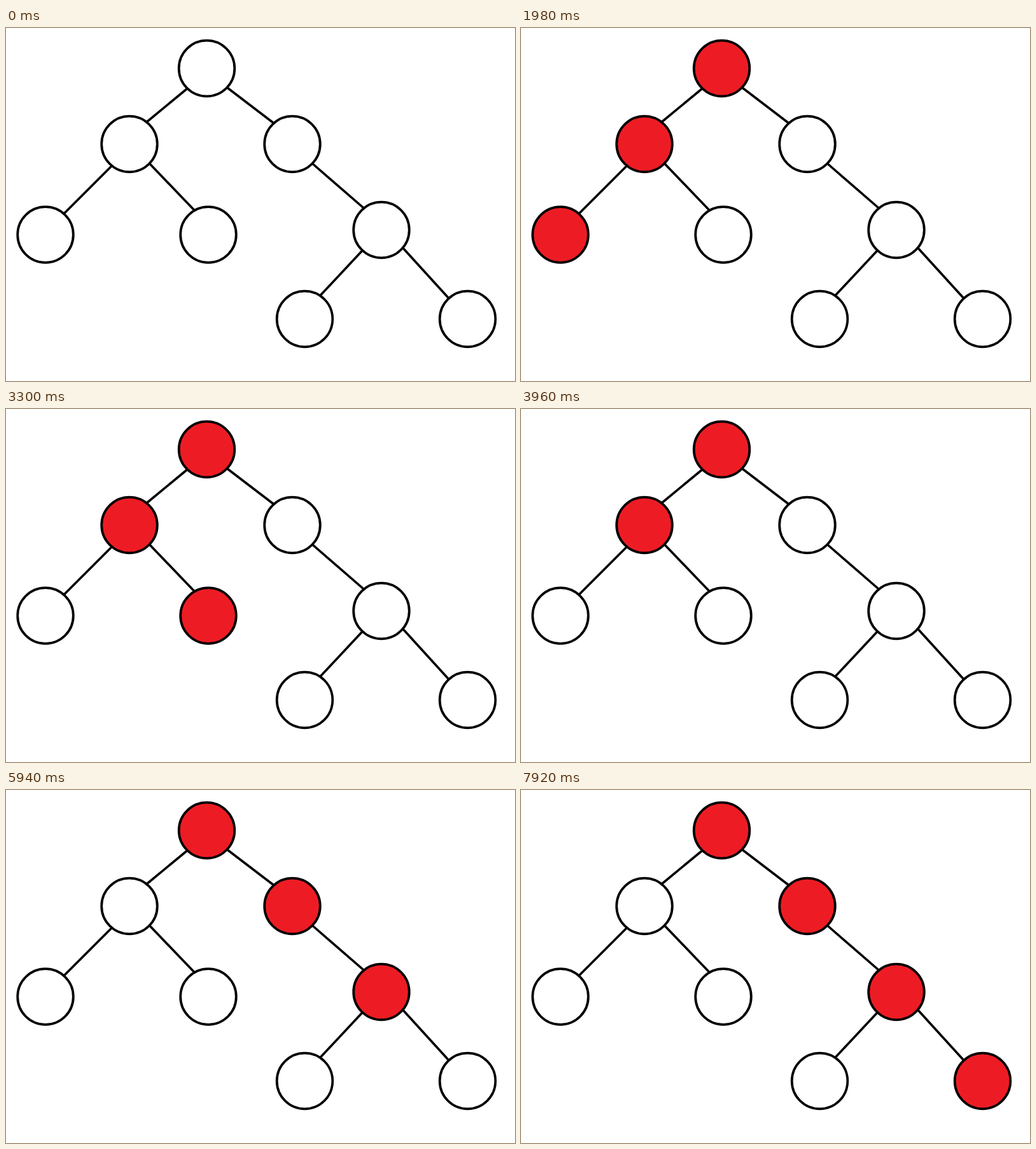
Animation, 800 px wide and 555 px high, one loop 8 s. Source, as an HTML page:

```html
<!DOCTYPE html>
<html lang="en">
<head>
<meta charset="utf-8">
<title>Depth-first traversal</title>
<style>
  html, body { margin: 0; width: 100%; height: 100%; overflow: hidden; background: #fff; }
  svg { display: block; width: 800px; height: 555px; }
  path { stroke: #000; stroke-width: 3.6; stroke-linecap: round; }
  circle { stroke: #000; stroke-width: 3.8; fill: #fff; }
  circle.on { fill: #ed1c24; }
</style>
</head>
<body>
<svg viewBox="0 0 800 555">
  <path d="M284.5 95.5L221.5 147.5M348 94L420 149M166 217L91 292M226 213.5L295.5 286M482 213.5L561.5 282.5M559.5 350.5L494.5 420M624 346L695 424"/>
</svg>
<script>
  const STEP = 660, LOOP = 8000;
  const nodes = {
    A: [315.5, 63.5],
    B: [194, 182.5], C: [450, 182.5],
    D: [62, 325], E: [318, 325], F: [590, 317.5],
    G: [469.5, 457.5], H: [725.5, 457.5]
  };
  // Nodes on the traversal stack at each step
  const stacks = ['', 'A', 'AB', 'ABD', 'AB', 'ABE', 'AB', 'A', 'AC', 'ACF', 'ACFG', 'ACF', 'ACFH'];

  const svg = document.querySelector('svg');
  const circles = {};
  for (const [name, [cx, cy]] of Object.entries(nodes)) {
    const c = document.createElementNS('http://www.w3.org/2000/svg', 'circle');
    c.setAttribute('cx', cx);
    c.setAttribute('cy', cy);
    c.setAttribute('r', 43.8);
    circles[name] = svg.appendChild(c);
  }

  const start = performance.now();
  function draw(now) {
    const t = Math.max(0, now - start) % LOOP;
    const stack = stacks[Math.floor(t / STEP)];
    for (const name in circles) circles[name].classList.toggle('on', stack.includes(name));
    requestAnimationFrame(draw);
  }
  draw(start);
</script>
</body>
</html>
```
